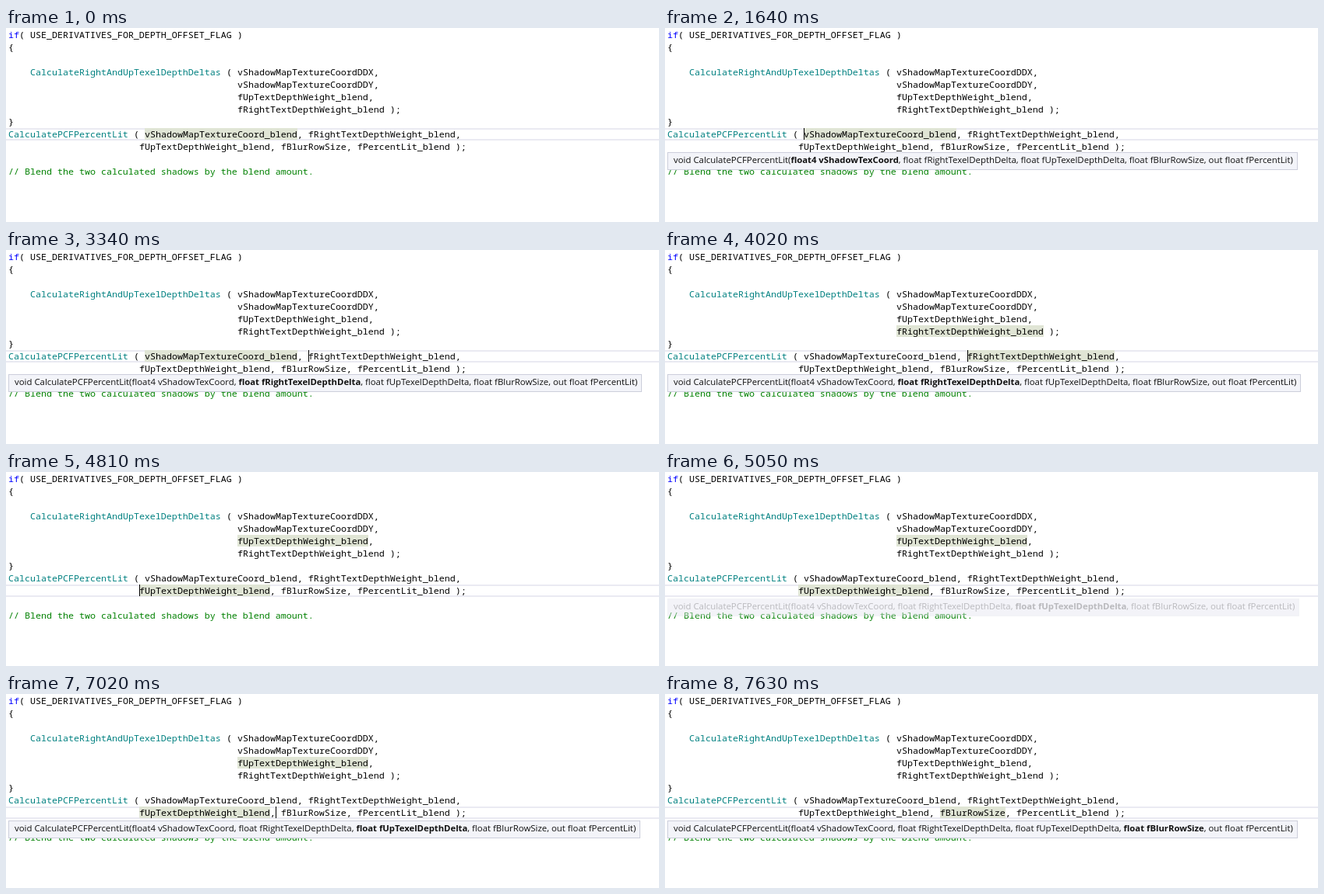
An HTML page with a canvas for the animation above (8 s loop, 838 px wide and 250 px high).

```html
<!DOCTYPE html>
<html lang="en">
<head>
<meta charset="utf-8">
<title>Parameter info</title>
<style>
  html, body { margin: 0; width: 100%; height: 100%; overflow: hidden; background: #fff; }
  canvas { display: block; }
</style>
</head>
<body>
<canvas id="stage" width="838" height="250"></canvas>
<script>
const ctx = document.getElementById('stage').getContext('2d');
const LOOP = 8000, BLINK = 518, FIRST_BLINK = 370, WORD_DELAY = 120;
const CHAR = 7, ROW = 16, LEFT = 3, TOP = 1;
const CODE_FONT = '500 11.667px "Noto Sans Mono", "DejaVu Sans Mono", monospace';
const TIP_FONT = '11.4px "Open Sans", "Noto Sans", sans-serif';
const TIP_BOLD = 'bold 11.3px "Open Sans", "Noto Sans", sans-serif';

const argPad = ' '.repeat(42);
const code = [
  'if( USE_DERIVATIVES_FOR_DEPTH_OFFSET_FLAG )',
  '{',
  '',
  '    CalculateRightAndUpTexelDepthDeltas ( vShadowMapTextureCoordDDX,',
  argPad + 'vShadowMapTextureCoordDDY,',
  argPad + 'fUpTextDepthWeight_blend,',
  argPad + 'fRightTextDepthWeight_blend );',
  '}',
  'CalculatePCFPercentLit ( vShadowMapTextureCoord_blend, fRightTextDepthWeight_blend,',
  ' '.repeat(24) + 'fUpTextDepthWeight_blend, fBlurRowSize, fPercentLit_blend );',
  '',
  '// Blend the two calculated shadows by the blend amount.'
];

const params = ['float4 vShadowTexCoord', 'float fRightTexelDepthDelta',
  'float fUpTexelDepthDelta', 'float fBlurRowSize', 'out float fPercentLit'];
const args = ['vShadowMapTextureCoord_blend', 'fRightTextDepthWeight_blend',
  'fUpTextDepthWeight_blend', 'fBlurRowSize'];

// Every place in the code where a word stands
const find = word => code.flatMap((line, row) =>
  line.includes(word) ? [{ row, col: line.indexOf(word) }] : []);

// Caret moves: time, argument, offset inside it
const moves = [[-200, 0, 0], [3160, 0, 28], [3340, 1, 0], [4140, 1, 1],
  [4690, 2, 0], [6780, 2, 24], [6960, 2, 25], [7140, 3, 0]];
// Tooltip opacity from a given time on
const fades = [[-200, 0], [1640, 1], [4690, 0], [5050, 0.25], [5420, 1]];

const at = (track, t) => track.filter(step => step[0] <= t).pop();
const colX = col => LEFT + col * CHAR;
const rowY = row => TOP + row * ROW;
const blinks = t => Math.floor((t - FIRST_BLINK) / BLINK);

function rect(x, y, w, h, color) {
  ctx.fillStyle = color;
  ctx.fillRect(x, y, w, h);
}

function text(str, x, y, font, color) {
  ctx.font = font;
  ctx.fillStyle = color;
  ctx.fillText(str, x, y);
  return x + ctx.measureText(str).width;
}

function headColor(head) {
  if (head === 'if') return '#0000ff';
  return head.startsWith('//') ? '#008000' : '#008080';
}

function drawCode() {
  code.forEach((line, row) => {
    const [, indent, head = '', rest] = line.match(/^(\s*)(if|Calculate\w+|\/\/.*)?(.*)$/);
    const y = rowY(row) + 12;
    text(head, colX(indent.length), y, CODE_FONT, headColor(head));
    text(rest, colX(indent.length + head.length), y, CODE_FONT, '#000');
  });
}

function drawTip(index, row, alpha) {
  const top = 160 + 3 * (row - 8);
  const pieces = [
    ['void CalculatePCFPercentLit(' + params.slice(0, index).map(p => p + ', ').join(''), TIP_FONT],
    [params[index], TIP_BOLD],
    [params.slice(index + 1).map(p => ', ' + p).join('') + ')', TIP_FONT]
  ];
  let width = 14;
  for (const [str, font] of pieces) {
    ctx.font = font;
    width += ctx.measureText(str).width;
  }
  width = Math.round(width);

  ctx.globalAlpha = alpha;
  rect(3, top, width, 23, '#cccedb');
  rect(4, top + 1, width - 2, 21, '#f3f4f9');
  let x = 11;
  for (const [str, font] of pieces) x = text(str, x, top + 14, font, '#111');
  ctx.globalAlpha = 1;
}

function draw(t) {
  const [moved, arg, offset] = at(moves, t);
  const { row, col } = find(args[arg]).pop();
  const y = rowY(row);

  rect(0, 0, 838, 250, '#fff');
  rect(0, y, 838, 2, '#eaeaf2');
  rect(0, y + 14, 838, 2, '#eaeaf2');

  const word = args[at(moves, t - WORD_DELAY)[1]];
  for (const spot of find(word)) {
    rect(colX(spot.col), rowY(spot.row), word.length * CHAR, 15, '#e0e5d5');
  }
  drawCode();

  const caretOn = (blinks(t) - blinks(moved)) % 2 === 0;
  if (caretOn) rect(colX(col + offset), y, 1, 15, '#000');

  const alpha = at(fades, t)[1];
  if (alpha) drawTip(arg, row, alpha);
}

const start = performance.now();
function tick() {
  draw((performance.now() - start) % LOOP);
  requestAnimationFrame(tick);
}
tick();
</script>
</body>
</html>
```
